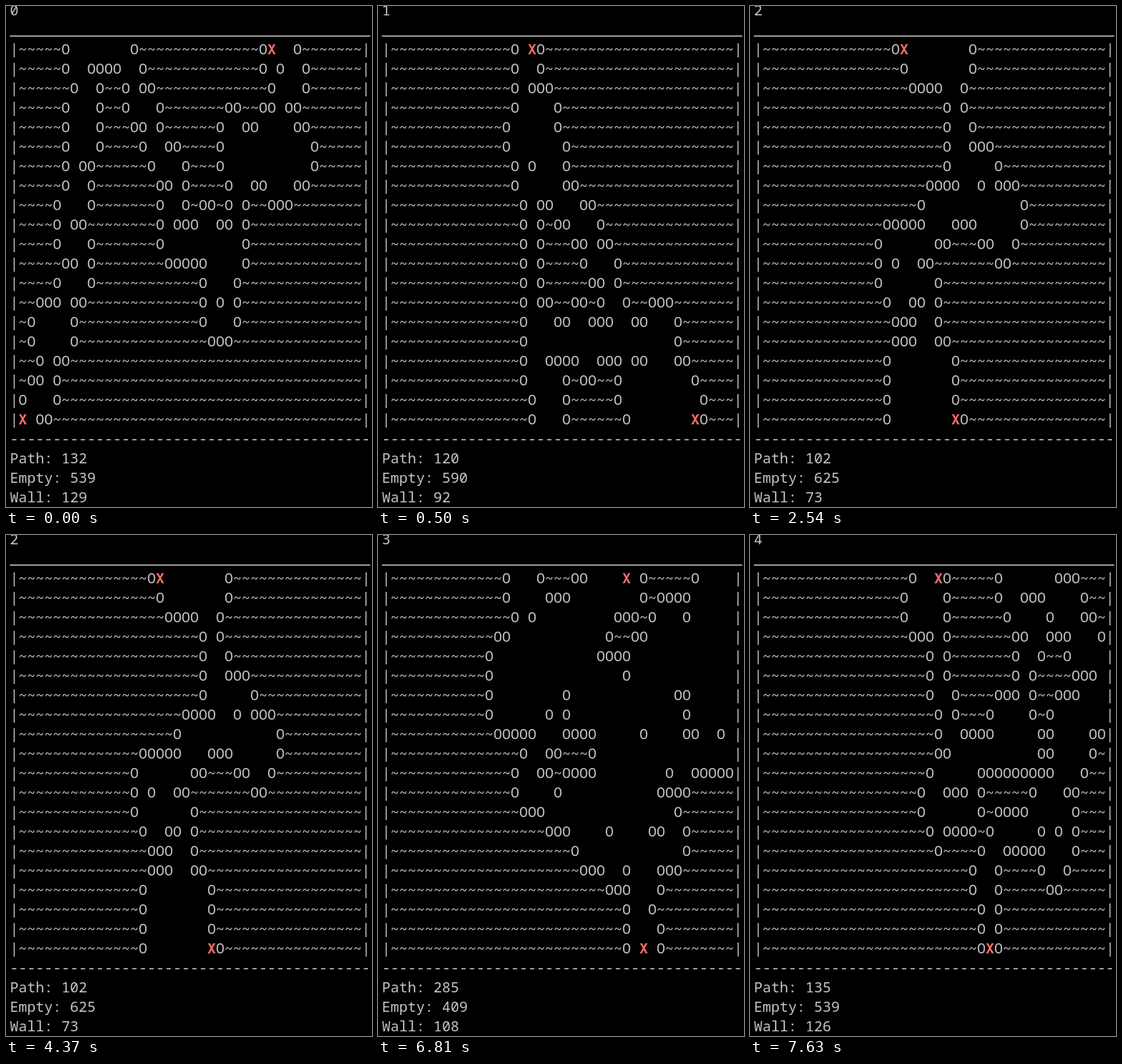
Animation, 469 px wide and 643 px high, one loop 8000 ms. Source, as an HTML page:

```html
<!DOCTYPE html>
<html lang="en">
<head>
<meta charset="utf-8">
<title>Maze runs</title>
<style>
  html, body { margin: 0; width: 100%; height: 100%; overflow: hidden; background: #000; }
  pre {
    position: absolute; left: 5px; top: -8px; margin: 0; opacity: 0;
    font: 18.333px/25px "Noto Sans Mono", "DejaVu Sans Mono", monospace;
    font-variant-ligatures: none;
    color: #c7c7c7;
  }
  b { color: #ff6e67; }
</style>
</head>
<body>
<script>
const LOOP = 8000, COLS = 40;

// Each row: count of leading "~", then its cells; the rest is filled up to COLS.
const runs = [
  { start: 0, path: 132, empty: 539, wall: 129, rows: [
    "5O       O~~~~~~~~~~~~~~OX  O",
    "5O  OOOO  O~~~~~~~~~~~~~O O  O",
    "6O  O~~O OO~~~~~~~~~~~~~O   O",
    "5O   O~~O   O~~~~~~~OO~~OO OO",
    "5O   O~~~OO O~~~~~~O  OO    OO",
    "5O   O~~~~O  OO~~~~O          O",
    "5O OO~~~~~~O   O~~~O          O",
    "5O  O~~~~~~~OO O~~~~O  OO   OO",
    "4O   O~~~~~~~O  O~OO~O O~~OOO",
    "4O OO~~~~~~~~O OOO  OO O",
    "4O   O~~~~~~~O         O",
    "5OO O~~~~~~~~OOOOO    O",
    "4O   O~~~~~~~~~~~~O   O",
    "2OOO OO~~~~~~~~~~~~~O O O",
    "1O    O~~~~~~~~~~~~~~O   O",
    "1O    O~~~~~~~~~~~~~~~OOO",
    "2O OO",
    "1OO O",
    "0O   O",
    "0X OO"
  ] },
  { start: 500, path: 120, empty: 590, wall: 92, rows: [
    "14O XO",
    "14O  O",
    "14O OOO",
    "14O    O",
    "13O     O",
    "13O      O",
    "14O O   O",
    "14O     OO",
    "15O OO   OO",
    "15O O~OO   O",
    "15O O~~~OO OO",
    "15O O~~~~O   O",
    "15O O~~~~~OO O",
    "15O OO~~OO~O  O~~OOO",
    "15O   OO  OOO  OO   O",
    "15O                 O",
    "15O  OOOO  OOO OO   OO",
    "15O    O~OO~~O        O",
    "16O   O~~~~~O         O",
    "16O   O~~~~~~O       XO"
  ] },
  { start: 2540, path: 102, empty: 625, wall: 73, rows: [
    "15OX       O",
    "16O       O",
    "17OOOO  O",
    "21O O",
    "21O  O",
    "21O  OOO",
    "21O     O",
    "19OOOO  O OOO",
    "18O           O",
    "14OOOOO   OOO     O",
    "13O      OO~~~OO  O",
    "13O O  OO~~~~~~~OO",
    "13O      O",
    "14O  OO O",
    "15OOO  O",
    "15OOO  OO",
    "14O       O",
    "14O       O",
    "14O       O",
    "14O       XO"
  ] },
  { start: 5590, path: 285, empty: 409, wall: 108, rows: [
    "13O   O~~~OO    X O~~~~~O ",
    "13O    OOO        O~OOOO ",
    "14O O         OOO~O   O ",
    "12OO           O~~OO ",
    "11O            OOOO ",
    "11O               O ",
    "11O        O            OO ",
    "11O      O O             O ",
    "12OOOOO   OOOO     O    OO  O ",
    "15O  OO~~~O ",
    "14O  OO~OOOO        O  OOOOO",
    "14O    O           OOOO",
    "15OOO               O",
    "18OOO    O    OO  O",
    "21O            O",
    "22OOO  O   OOO",
    "25OOO   O",
    "27O  O",
    "27O   O",
    "27O X O"
  ] },
  { start: 7630, path: 135, empty: 539, wall: 126, rows: [
    "17O  XO~~~~~O      OOO",
    "16O    O~~~~~O  OOO    O",
    "16O    O~~~~~~O    O   OO",
    "17OOO O~~~~~~~OO  OOO   O",
    "19O O~~~~~~~O  O~~O ",
    "19O O~~~~~~~O O~~~~OOO ",
    "19O  O~~~~OOO O~~OOO ",
    "20O O~~~O    O~O ",
    "20O  OOOO     OO    OO",
    "20OO          OO    O",
    "19O     OOOOOOOOO   O",
    "18O  OOO O~~~~~O   OO",
    "18O      O~OOOO     O",
    "19O OOOO~O     O O O",
    "20O~~~~O  OOOOO   O",
    "24O  O~~~~O  O",
    "24O  O~~~~~OO",
    "25O O",
    "25O O",
    "25OXO"
  ] }
];

function expand(row) {
  const lead = parseInt(row, 10);
  const cells = "~".repeat(lead) + row.slice(String(lead).length);
  return "|" + cells.padEnd(COLS, row.endsWith(" ") ? " " : "~") + "|";
}

function screen(run, i) {
  const lines = [
    i,
    "_".repeat(COLS + 2),
    ...run.rows.map(expand),
    "-".repeat(COLS + 2),
    "Path: " + run.path,
    "Empty: " + run.empty,
    "Wall: " + run.wall
  ];
  return lines.join("\n").replace(/X/g, "<b>X</b>");
}

runs.forEach((run, i) => {
  const pre = document.createElement("pre");
  pre.innerHTML = screen(run, i);
  document.body.append(pre);

  const end = i + 1 < runs.length ? runs[i + 1].start : LOOP;
  const steps = [[0, 0], [run.start, 1], [end, 0], [LOOP, 0]];
  pre.animate(
    steps.map(([time, opacity]) => ({ offset: time / LOOP, opacity, easing: "step-end" })),
    { duration: LOOP, iterations: Infinity }
  );
});
</script>
</body>
</html>
```
